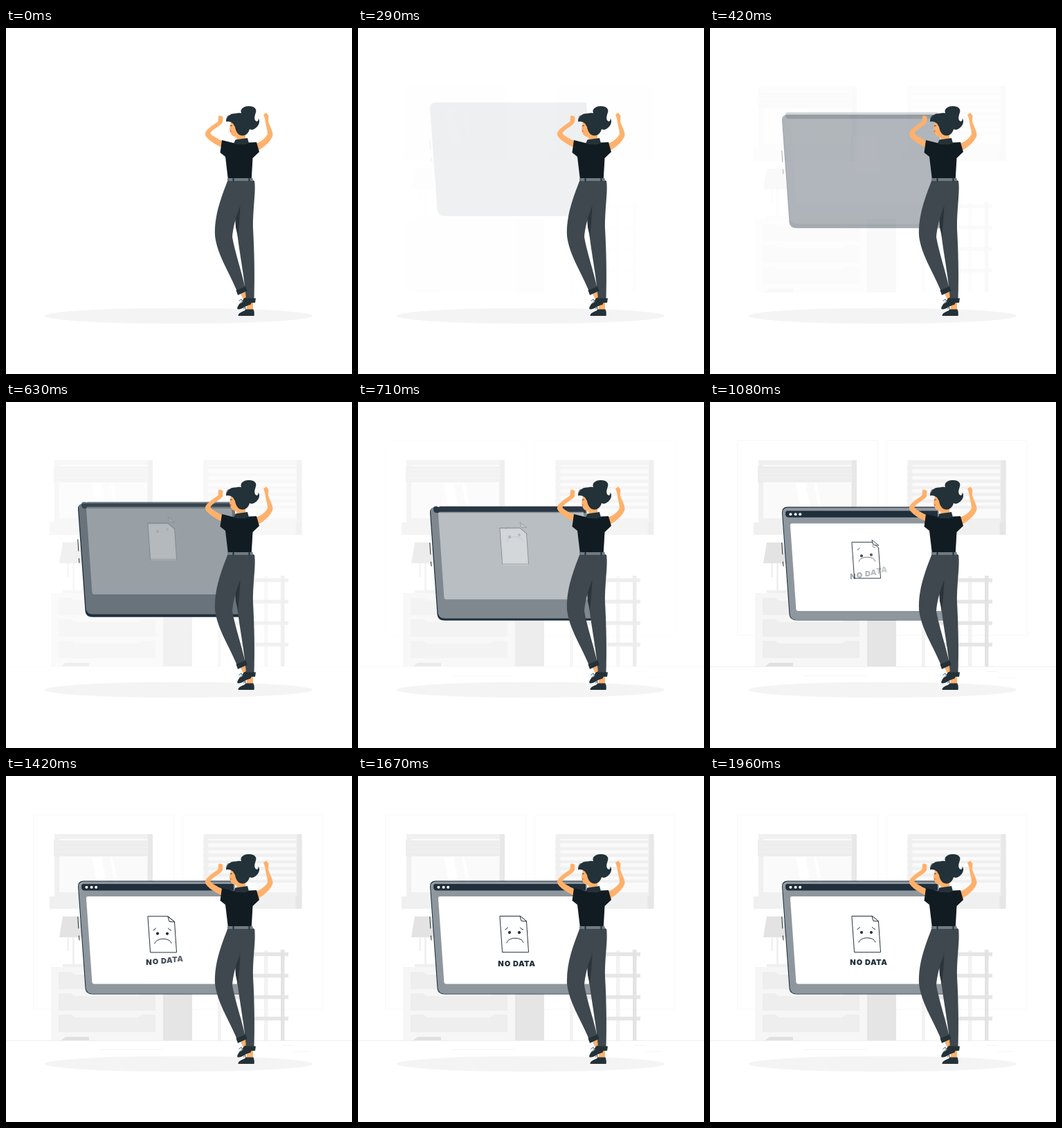
An HTML page for the animation above (2 s loop, 500x500 px).

```html
<!DOCTYPE html>
<html lang="en">
<head>
<meta charset="utf-8">
<title>No data</title>
<style>
  html, body { margin: 0; width: 100%; height: 100%; overflow: hidden; background: #fff; }
  svg { display: block; width: 100vw; height: 100vh; }
  .ink { fill: #1f2f3c; }
  .line { fill: #fff; stroke: #263238; stroke-width: 1; stroke-linejoin: round; stroke-linecap: round; }
  .thin { fill: none; stroke: #263238; stroke-width: 1; stroke-linecap: round; }
  .skin { fill: #ffb16c; }
  .hair { fill: #233138; }
  .shirt { fill: #111c22; }
  .pants { fill: #3e484e; }
  #word text { font: 900 11px Inter, "DejaVu Sans", sans-serif; text-anchor: middle; fill: #1f2f3c; }
</style>
</head>
<body>
<svg viewBox="0 0 500 500">
  <!-- data-fade: start, duration -->
  <g data-fade="560 340">
    <g fill="none" stroke="#f8f8f8">
      <rect x="39.5" y="55.5" width="203" height="282" rx="2"/>
      <rect x="255.5" y="55.5" width="203" height="282" rx="2"/>
    </g>
    <path d="M0 382.5H500" stroke="#eee"/>
    <path d="M136 395.5H225M400 389.5H416M416 398.5H440" stroke="#f5f5f5"/>
  </g>

  <g data-fade="240 640">
    <!-- windows -->
    <g id="windowLeft">
      <path d="M70 84H212V175H70Z" fill="#f0f0f0"/>
      <path d="M205 84H212V175H205Z" fill="#e8e8e8"/>
      <path d="M77 91H204V168H77Z" fill="#fafafa"/>
      <path d="M124 117H138L148 168H134ZM150 117H154L164 168H160Z" fill="#fff"/>
      <path d="M63 174H212V192H63Z" fill="#f0f0f0"/>
      <path d="M203 174H212V192H203Z" fill="#e6e6e6"/>
    </g>
    <use href="#windowLeft" x="215.5"/>
    <path d="M69 93H204V116H69Z" fill="#ededed"/>
    <path d="M69 97.5H204M69 103.5H204M69 109.5H204" stroke="#f2f2f2"/>
    <path d="M285 95H420M285 105H420M285 114.5H420M285 124H420M285 133.5H420M285 143H420M285 152H420" stroke="#f0f0f0" stroke-width="4.5"/>

    <!-- lamp and cabinet -->
    <path d="M88.5 232H91V253H88.5ZM96 232H99V273H96ZM82 272H112V276H82Z" fill="#f0f0f0"/>
    <path d="M82 203H106L111 233H77Z" fill="#e3e3e3"/>
    <path d="M65 276H227V382H65Z" fill="#f6f6f6"/>
    <path d="M227 276H269V382H227Z" fill="#e5e5e5"/>
    <path id="drawer" d="M76 283H94L100 287H190L197 283H216V308H76Z" fill="#eee"/>
    <use href="#drawer" y="31"/>
    <use href="#drawer" y="62"/>
    <path d="M80 382L86 377H120V382Z" fill="#e0e0e0"/>

    <!-- rack -->
    <path d="M306 252H311V382H306ZM373 252H378.5V382H373Z" fill="#f2f2f2"/>
    <path d="M320 257.5H408M320 288.5H408M320 319.5H408M320 350.5H408" stroke="#e6e6e6" stroke-width="5.5"/>
    <path d="M397 251H402.5V382H397Z" fill="#e3e3e3"/>
  </g>

  <ellipse cx="249.5" cy="416" rx="193.5" ry="11.3" fill="#f4f4f4"/>

  <!-- data-drop: start, fall time, overshoot, settle time, share of the fall spent fading -->
  <g data-drop="245 600 3.5 230 .6">
    <path class="ink" d="M112 151.5H330L341 315.5H125Q115.5 315.5 114.5 307L104 160Q103.5 151.5 112 151.5Z"/>
    <path class="thin" d="M103.800 203.500L104.800 220M105.400 231L106 237"/>
  </g>
  <path fill="#fff" fill-opacity=".5" data-drop="285 600 3.5 230 .8" d="M112.500 152.500H330L340.500 314.800H125.500Q116.500 314.500 115.600 307L105 160Q104.700 152.500 112.500 152.500Z"/>
  <path class="ink" data-drop="295 640 2.5 300 .7" d="M112 156H329V165.500H114Q109.500 165.500 109 161Q108.700 156 112 156Z"/>
  <g fill="#fff">
    <circle cx="116.400" cy="160.800" r="2" data-drop="325 700 1.5 300 .7"/>
    <circle cx="123.600" cy="160.800" r="2" data-drop="345 700 1.5 300 .7"/>
    <circle cx="130.200" cy="160.800" r="2" data-drop="370 700 1.5 300 .7"/>
  </g>
  <path fill="#fff" data-drop="380 700 1.5 320 .87" d="M118.500 174H326L334 300.500H127.500Q124.700 300.500 124.400 297.500L116 177Q115.800 174 118.500 174Z"/>

  <!-- sad sheet: fill, outline, fold, face -->
  <path fill="#fff" data-drop="385 800 1.5 300 .85" d="M205.300 202.500H234L243.500 210.500L246.500 254.700H209Z"/>
  <path class="thin" data-drop="400 800 1.5 300 .9" d="M205.300 202.500H234L243.500 210.500L246.500 254.700H209Z"/>
  <path class="line" data-drop="490 800 1.5 300 .85" d="M234 202.500L236 209.500L243.500 210Z"/>
  <circle class="ink" cx="219" cy="226" r="2.100" data-drop="520 800 2 400 .8"/>
  <circle class="ink" cx="233" cy="226" r="2.100" data-drop="550 800 2 400 .8"/>
  <path class="thin" data-drop="595 850 1.5 350 .8" d="M215 240.500C216.500 232 237 231.500 238.800 240"/>
  <path class="thin" data-drop="590 800 1.5 400 .8" d="M213 221.500Q215.500 221 216.300 218.500"/>
  <path class="thin" data-drop="640 800 1.5 400 .8" d="M234.500 218.500Q235.500 221 238.500 221.500"/>
  <g id="word"></g>

  <!-- woman -->
  <g>
    <path class="skin" d="M307 127.500L308.500 126.500L313.500 128L313 136C311 141 297 147 295.500 152C296 155 306 160 313 163.500L311 172C301 168 288 159 287.800 153C288 147 300 140 306.500 135Z"/>
    <path class="skin" d="M372 125L376.500 122.500L379.500 127L379 135C381 142 386 149 385.500 155C384 162 374 172 365 176.500L361 167C370 164 376 158 378 153C378 147 375 140 374.500 132Z"/>

    <path class="skin" d="M348 397H357V408H348ZM339 384L346 381L349 390L343 392Z"/>
    <path class="hair" d="M335.500 416C335.500 410.500 343 410.500 347 406.500H357.500C359 410 359 413 358.500 416Z"/>
    <path class="hair" d="M334 405.500C335 399 341 396 344 390.500L351 387.500C355 392 356.500 396 353 400C346 401 342 406.500 335.500 406.500Z"/>
    <path d="M336.500 394.500L340 392L341.500 395M343 406L346 403.500L346.500 407" fill="none" stroke="#263238" stroke-width=".8"/>
    <path d="M339.500 397.500L342 394.500M343.500 408.500L346 406.500" stroke="#fff" stroke-width="1"/>

    <path class="pants" d="M334 221H359C361.500 235 356.500 262 357 290C359 325 359.500 360 358.500 392H347C344.500 360 337.500 325 334.500 300L336 258Z"/>
    <path fill="#2b343a" d="M338.500 256L331 274L332 288L335.200 302C336.500 285 338 275 338.500 256Z"/>
    <path class="pants" d="M320.500 220H358C356 236 346 246 338 258C331.500 274 328 290 327 302C331 325 340 350 345.500 375L334 381C324 355 305 328 302 300C301 270 311 245 320.500 220Z"/>
    <path class="hair" d="M332.500 379L346.500 373.500L348.500 380L335 386ZM346 390.500H361L360 397H347.500Z"/>

    <path class="shirt" d="M312 162L330 166.500C338 168.500 346 168 351 165.500L362 165L366 179L356.500 188L354.800 218H320.800L317 186L309.500 180Z"/>
    <path fill="#6f7b82" d="M320 217H356.500L357 221H320Z"/>
    <path class="ink" d="M327.500 216.500H329.500V221.500H327.500ZM350.500 216.500H352.500V221.500H350.500Z"/>

    <path class="skin" d="M325 136L323 146L325 153L327.500 156L333 158L334 164H346V148L334 136Z"/>
    <path d="M323.500 148L326 148.500L324.500 150.500Z" fill="#e0523f"/>
    <path d="M324 141.500L326.500 141" stroke="#263238" stroke-width="1"/>
    <path class="hair" d="M329 167L331.500 161.500L349 159L351 166.500Q340 169.500 329 167Z"/>
    <path class="hair" d="M318 135.500C318.500 128 324 123 332 123.500C336 122 339 123 340 123C337.500 117 344 112.500 351 113C358 112.500 363 117 361 122C359 128 358 133 362 135C364 135 365 133 364.500 130.500C367.500 134 366 140 362 143.500C358 147.500 353.500 147.500 352 146C351 151 347 156 341 155.500C335 155 332 149 331 143L328 138Q323 134 318 135.500Z"/>
    <path d="M321.500 126C319.500 128 318.500 131 318.500 134" fill="none" stroke="#233138" stroke-width=".8"/>
  </g>
</svg>
<script>
  const LOOP = 2000, DROP = 50;
  const word = document.getElementById('word');
  const clamp = x => Math.min(1, Math.max(0, x));
  const numbers = text => text.split(' ').map(Number);

  [['N', 206.4], ['O', 216.1], ['D', 228], ['A', 236.3], ['T', 243.7], ['A', 251.5]].forEach(([letter, x], i) => {
    const text = document.createElementNS('http://www.w3.org/2000/svg', 'text');
    text.textContent = letter;
    text.setAttribute('x', x);
    text.setAttribute('y', 273);
    text.dataset.drop = `${690 + 26 * i} 900 2 240 .85`;
    word.append(text);
  });

  const fades = [...document.querySelectorAll('[data-fade]')].map(el => {
    const [start, time] = numbers(el.dataset.fade);
    return { el, start, time };
  });
  const drops = [...document.querySelectorAll('[data-drop]')].map(el => {
    const [start, fall, over, settle, share] = numbers(el.dataset.drop);
    return { el, start, fall, over, settle, time: fall * share };
  });

  // Sine ease-out past the resting place, then a soft return
  function offset(p, t) {
    const down = clamp((t - p.start) / p.fall);
    if (down < 1) return -DROP + (DROP + p.over) * Math.sin(down * Math.PI / 2);
    const back = clamp((t - p.start - p.fall) / p.settle);
    return p.over * (1 + Math.cos(back * Math.PI)) / 2;
  }

  function draw(now) {
    const t = now % LOOP;
    for (const p of [...fades, ...drops]) {
      p.el.setAttribute('opacity', clamp((t - p.start) / p.time) ** 1.3);
    }
    for (const p of drops) {
      p.el.setAttribute('transform', `translate(0 ${offset(p, t).toFixed(2)})`);
    }
  }

  let origin;
  function tick(now) {
    origin ??= now;
    draw(now - origin);
    requestAnimationFrame(tick);
  }
  draw(0);
  requestAnimationFrame(tick);
</script>
</body>
</html>
```
